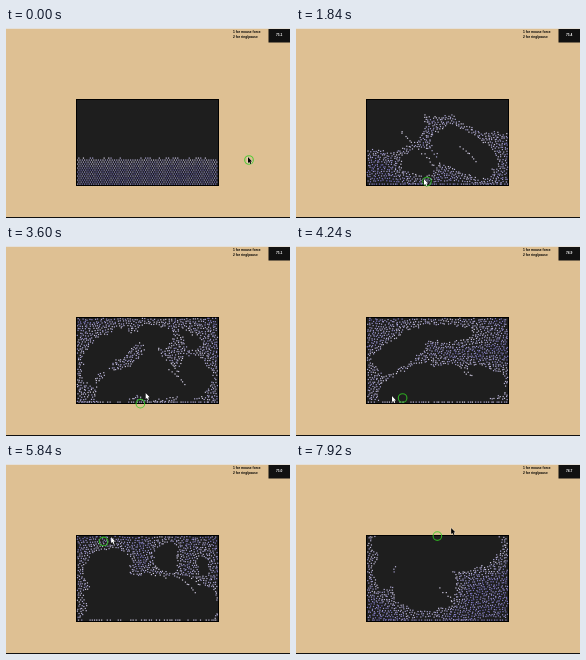
An HTML page with a canvas that plays this animation: 284 px wide and 190 px high, repeating every 8000 ms.

```html
<!DOCTYPE html>
<html lang="en">
<head>
<meta charset="utf-8">
<title>Particle fluid</title>
<style>
  html, body { margin: 0; width: 100%; height: 100%; overflow: hidden; background: #dec093; }
  canvas { display: block; }
</style>
</head>
<body>
<canvas id="stage" width="284" height="190"></canvas>
<script>
const ctx = document.getElementById('stage').getContext('2d');
const LOOP = 8000, LAG = 80, BOX = { x: 70, y: 71, w: 143, h: 87 };

const mix = (a, b, k) => a + (b - a) * k;
const clamp = v => Math.max(0, Math.min(1, v));
const hash = (i, j) => {
  const v = Math.sin(i * 127.1 + j * 311.7) * 43758.5453;
  return v - Math.floor(v);
};

// Rounded hollow in the fluid: positive inside, negative outside.
function hollow(cx, cy, rx, ry, tilt = 0) {
  const c = Math.cos(tilt), s = Math.sin(tilt), r = Math.min(rx, ry);
  return (x, y) => {
    const dx = x - cx, dy = y - cy;
    const u = Math.abs(dx * c + dy * s) / rx, v = Math.abs(dy * c - dx * s) / ry;
    return (1 - Math.pow(u ** 2.5 + v ** 2.5, .4)) * r;
  };
}
const join = (...parts) => (x, y) => Math.max(...parts.map(p => p(x, y)));
const carve = (whole, hole) => (x, y) => Math.min(whole(x, y), -hole(x, y));

const calm = hollow(141, 50, 900, 80.5);
const heap = join(hollow(141, 60, 110, 28), hollow(88, 84, 42, 39), hollow(196, 72, 46, 32, .2),
  hollow(123, 134, 18, 13), hollow(168, 124, 34, 20, .5));
const split = join(hollow(102, 98, 25, 14, -.2), hollow(84, 124, 9, 24, .3),
  hollow(149, 114, 19, 36), hollow(188, 115, 17, 35), hollow(110, 142, 17, 19));
const tongue = join(hollow(103, 107, 30, 14, -.6), hollow(145, 87, 32, 8),
  hollow(113, 140, 34, 17, -.5), hollow(160, 138, 51, 19));
const low = join(hollow(145, 142, 67, 31), hollow(102, 108, 23, 23),
  hollow(160, 94, 12, 15), hollow(197, 101, 5, 10));
const island = carve(join(hollow(117, 93, 40, 28), hollow(98, 130, 20, 22),
  hollow(181, 108, 27, 31)), hollow(177, 107, 17, 16));
const slosh = join(hollow(142, 78, 64, 30), hollow(128, 120, 32, 27), hollow(88, 108, 10, 17));
const poses = [[450, calm], [1840, heap], [2960, split], [4240, tongue],
  [5840, low], [6800, island], [7920, slosh], [8800, slosh]];

// Pointer: time, x, y.
const path = [[0, 243, 132], [300, 243, 132], [1000, 115, 112], [1400, 150, 150],
  [1840, 129, 154], [2350, 150, 161], [2960, 112, 160], [3450, 130, 162], [3850, 150, 130],
  [4240, 97, 153], [5400, 80, 105], [5840, 106, 76], [6250, 185, 105], [6800, 144, 91],
  [7500, 72, 100], [7920, 156, 67], [8300, 185, 62]];

function spanAt(keys, t) {
  let i = 0;
  while (i < keys.length - 2 && t >= keys[i + 1][0]) i++;
  return [i, clamp((t - keys[i][0]) / (keys[i + 1][0] - keys[i][0]))];
}

function pointer(t) {
  const [i, k] = spanAt(path, t);
  const at = n => path[Math.max(0, Math.min(path.length - 1, n))];
  const [a, b, c, d] = [at(i - 1), at(i), at(i + 1), at(i + 2)];
  return [1, 2].map(n => b[n] + .5 * k * (c[n] - a[n] +
    k * (2 * a[n] - 5 * b[n] + 4 * c[n] - d[n] + k * (3 * (b[n] - c[n]) + d[n] - a[n]))));
}

function drop(x, y, depth, tone) {
  const k = clamp(depth / 12) * .5 + tone * .5;
  ctx.fillStyle = `rgb(${mix(218, 108, k)},${mix(213, 102, k)},${mix(230, 184, k)})`;
  ctx.fillRect(x - .6, y - .6, 1.2, 1.2);
}

function fluid(t) {
  const [i, raw] = spanAt(poses, t), k = raw * raw * (3 - 2 * raw);
  const from = poses[i][1], to = poses[i + 1][1];
  const stir = clamp((t - 350) / 900), gap = mix(2.3, 2.6, stir), rise = gap * .87;
  const empty = (x, y) => mix(from(x, y), to(x, y), k) +
    stir * 1.6 * Math.sin(x * .21 + t / 600) * Math.sin(y * .26 - t / 800);

  for (let row = 0; row * rise < BOX.h + 4; row++) {
    for (let col = -2; col * gap < BOX.w + 4; col++) {
      const a = hash(col, row), b = hash(row + 91, col), turn = a * 6.28 + t / 260;
      const u = BOX.x + 1.7 + (col + row % 2 / 2) * gap, v = BOX.y + BOX.h - 1.9 - row * rise;
      // A slow swell bends the rows, small circles shake each drop.
      const x = u + stir * (Math.sin(v / 9 + t / 500) * 2 + Math.sin(turn) * .6 + b - .5);
      const y = v + stir * (row && Math.sin(u / 11 - t / 600) * 1.6 + Math.cos(turn) * .6);
      if (x < BOX.x + 1.3 || x > BOX.x + BOX.w - 1.3) continue;
      if (y < BOX.y + 1.3 || y > BOX.y + BOX.h - 1) continue;
      const d = empty(x, y), wetFloor = row === 0 && a < .7;
      if (wetFloor || d < (b - .4) * 1.5) drop(x, y, -d, a);
    }
  }

  // Short strands of spray, thrown anew every cycle.
  for (let n = 0; n < 3 && stir === 1; n++) {
    const life = t / 1200 + n / 3, cycle = Math.floor(life), age = life - cycle;
    const x = mix(90, 185, hash(cycle, n)), y = mix(90, 125, hash(n, cycle));
    for (let m = 0; m < 8; m++) {
      const px = x + m * 2 + (hash(m, n) - .5) * 3 + age * 6;
      const py = y + m * 2.2 + (hash(n, m) - .5) * 3 + age * age * 14;
      if (empty(px, py) > 0) drop(px, py, 0, .2);
    }
  }
}

function arrow(x, y) {
  const inBox = x > BOX.x && x < BOX.x + BOX.w && y > BOX.y && y < BOX.y + BOX.h;
  ctx.beginPath();
  [[0, -3], [0, 3], [1.3, 2], [2.3, 4], [3.3, 3.5], [2.4, 1.6], [4.1, 1.4]]
    .forEach(([dx, dy]) => ctx.lineTo(x - 1 + dx, y + dy));
  ctx.closePath();
  ctx.lineWidth = .8;
  ctx.strokeStyle = inBox ? '#000' : 'rgba(255,255,255,.7)';
  ctx.stroke();
  ctx.fillStyle = inBox ? '#fff' : '#000';
  ctx.fill();
}

function rect(color, x, y, w, h) {
  ctx.fillStyle = color;
  ctx.fillRect(x, y, w, h);
}

function label(text, x, y, color) {
  ctx.fillStyle = color;
  ctx.fillText(text, x, y);
}

function draw(t) {
  rect('#dec093', 0, 0, 284, 190);
  rect('#e4e0da', 0, 0, 284, 1);
  rect('#111', 0, 189, 284, 1);
  rect('#111', 262.5, 1, 21.5, 13.5);
  ctx.font = 'bold 3.3px "Liberation Sans", sans-serif';
  label('1 for mouse force', 227, 4.8, '#000');
  label('2 for ring/pause', 227, 9.5, '#000');
  label((74.5 + hash(Math.floor(t / 80), 3)).toFixed(1), 270, 8, '#fff');

  rect('#000', BOX.x, BOX.y, BOX.w, BOX.h);
  rect('#1e1e1e', BOX.x + 1, BOX.y + 1, BOX.w - 2, BOX.h - 2);
  fluid(t);

  ctx.beginPath();
  ctx.arc(...pointer(t - LAG), 4.3, 0, 7);
  ctx.lineWidth = 1.1;
  ctx.strokeStyle = 'rgba(50,205,35,.8)';
  ctx.stroke();
  arrow(...pointer(t));
}

function tick() {
  draw(performance.now() % LOOP);
  requestAnimationFrame(tick);
}
tick();
</script>
</body>
</html>
```
